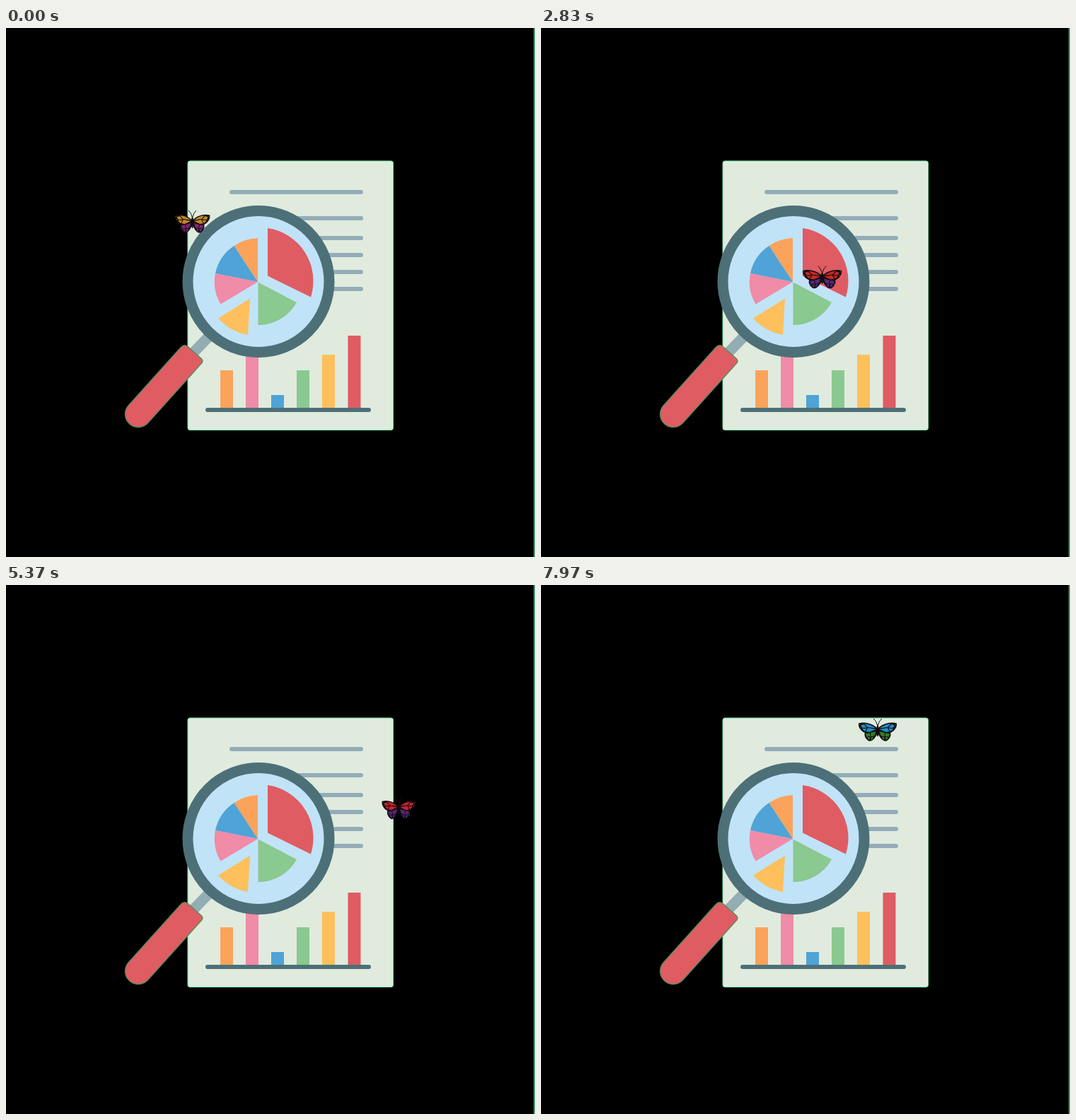
An HTML page that plays this animation: 748x748 px, repeating every 8000 ms.

```html
<!DOCTYPE html>
<html lang="en">
<head>
<meta charset="utf-8">
<title>Report and butterfly</title>
<style>
  html, body { margin: 0; width: 100%; height: 100%; overflow: hidden; background: #000; }
  svg { display: block; width: 100%; height: 100%; }
  .upper { fill: var(--upper); }
  .lower { fill: var(--lower); }
  .orange { fill: #fba35b; }
  .pink { fill: #f08ba8; }
  .blue { fill: #4fa3d6; }
  .green { fill: #8ac98f; }
  .yellow { fill: #fdc05c; }
  .red { fill: #df5c63; }
</style>
</head>
<body>
<svg viewBox="0 0 748 748">
  <defs>
    <g id="wing">
      <path d="M1 -3C8 -9 18 -12 27.500 -9.500C28.500 -4 24 2 18.500 4C20 9 17 13 13 15.500C8 17 4 12 1 6Z" fill="#130b10"/>
      <g class="upper">
        <path d="M2.500 -2.500C8 -6.500 13 -8.500 19 -8.800L14.500 -4Z"/>
        <path d="M2.500 -1L14 -3L17 2.300L12 3Z"/>
        <path d="M15.500 -3.500L20 -8L24.500 -6.500L22 -3Z"/>
        <path d="M15.500 -2.300L22.500 -2L18.500 2.300Z"/>
      </g>
      <g class="lower">
        <path d="M2.500 2L10.500 4L9.500 9.500L4.500 8Z"/>
        <path d="M11.500 4.300L17.500 5.300L16 9.500L10.500 9Z"/>
        <path d="M5.500 9.500L9.700 10.500L9 15Z"/>
        <path d="M10.700 10L15.700 10.500L12 14.500Z"/>
      </g>
      <g fill="#ddd" opacity=".55">
        <circle cx="26" cy="-7.500" r=".6"/>
        <circle cx="24.500" cy="-3" r=".6"/>
        <circle cx="17.500" cy="10" r=".6"/>
      </g>
      <path d="M.5 -7Q2 -13 6 -16" fill="none" stroke="#14120f"/>
    </g>
  </defs>

  <path d="M747 0V748" stroke="#6bd6a2" stroke-width="1.300"/>
  <rect x="257" y="188" width="290.500" height="380.500" rx="3" fill="#e0ebde" stroke="#6be0a0"/>
  <path d="M319 232H502M400 269H502M400 297H502M400 321H502M400 345H502M400 369H502"
        stroke="#93adb8" stroke-width="6" stroke-linecap="round"/>

  <path class="orange" d="M303 484h18v54h-18z"/>
  <path class="pink" d="M339 450h18v88h-18z"/>
  <path class="blue" d="M375 519h18v19h-18z"/>
  <path class="green" d="M411 484h18v54h-18z"/>
  <path class="yellow" d="M447 462h18v76h-18z"/>
  <path class="red" d="M483.500 435h18v103h-18z"/>
  <path d="M285 540H513" stroke="#4d7078" stroke-width="6" stroke-linecap="round"/>

  <path d="M260 464L292 431" stroke="#93adb4" stroke-width="15"/>
  <path class="red" transform="translate(187 546) rotate(-48)" stroke="#4f8f58" stroke-width="1.300"
        d="M0 -18.500H110Q118 -18.500 118 -10.500V13.500Q118 18.500 113 18.500H0A18.500 18.500 0 0 1 0 -18.500Z"/>
  <circle cx="357" cy="358.500" r="100" fill="#c1e3f7" stroke="#4d7078" stroke-width="15"/>

  <path class="orange" d="M356 359V297A62 62 0 0 0 322.500 308Z"/>
  <path class="blue" d="M356 359L322.500 308A62 62 0 0 0 296 347Z"/>
  <path class="pink" d="M356 359L296 347A62 62 0 0 0 303.500 390.500Z"/>
  <path class="green" d="M356.500 359.500L411 388A62 62 0 0 1 356.500 420Z"/>
  <path class="red" d="M370 350.500V283A75.500 75.500 0 0 1 431 380.500Z"/>
  <path class="yellow" d="M345 382.500L300 410.500A76 76 0 0 0 342 434Z"/>

  <g id="butterfly">
    <use href="#wing"/>
    <use href="#wing" transform="scale(-1 1)"/>
    <ellipse cy="1" rx="1.800" ry="8.500" fill="#130b10"/>
  </g>
</svg>
<script>
  const LOOP = 8;
  const FLAP_PERIOD = 0.34;
  const HUE_FADE = 0.5;
  // Straight flights between turns; each turn starts a change of hue.
  const turns = [
    { t: 0, x: 263.5, y: 274, hue: 0 },
    { t: 2.085, x: 350.5, y: 363, hue: -36 },
    { t: 5.34, x: 556, y: 317, hue: -116 },
    { t: 7.37, x: 508, y: 204.5, hue: -198 },
    { t: 8, x: 474.5, y: 205, hue: -198 }
  ];
  const butterfly = document.getElementById('butterfly');
  const mix = (a, b, k) => a + (b - a) * k;

  function draw(t) {
    const i = Math.max(0, turns.findIndex(turn => turn.t > t) - 1);
    const from = turns[i], to = turns[i + 1];
    const k = (t - from.t) / (to.t - from.t);
    const lastHue = i ? turns[i - 1].hue : from.hue;
    const hue = mix(lastHue, from.hue, Math.min(1, (t - from.t) / HUE_FADE));
    const flap = 0.93 + 0.07 * Math.cos(2 * Math.PI * (t - 2.83) / FLAP_PERIOD);

    butterfly.setAttribute('transform',
      `translate(${mix(from.x, to.x, k)} ${mix(from.y, to.y, k)}) scale(${flap} 1)`);
    butterfly.style.setProperty('--upper', `hsl(${398 + hue} 68% 45%)`);
    butterfly.style.setProperty('--lower', `hsl(${310 + hue} 52% 32%)`);
  }

  const start = performance.now();
  function frame() {
    draw((performance.now() - start) / 1000 % LOOP);
    requestAnimationFrame(frame);
  }
  frame();
</script>
</body>
</html>
```
